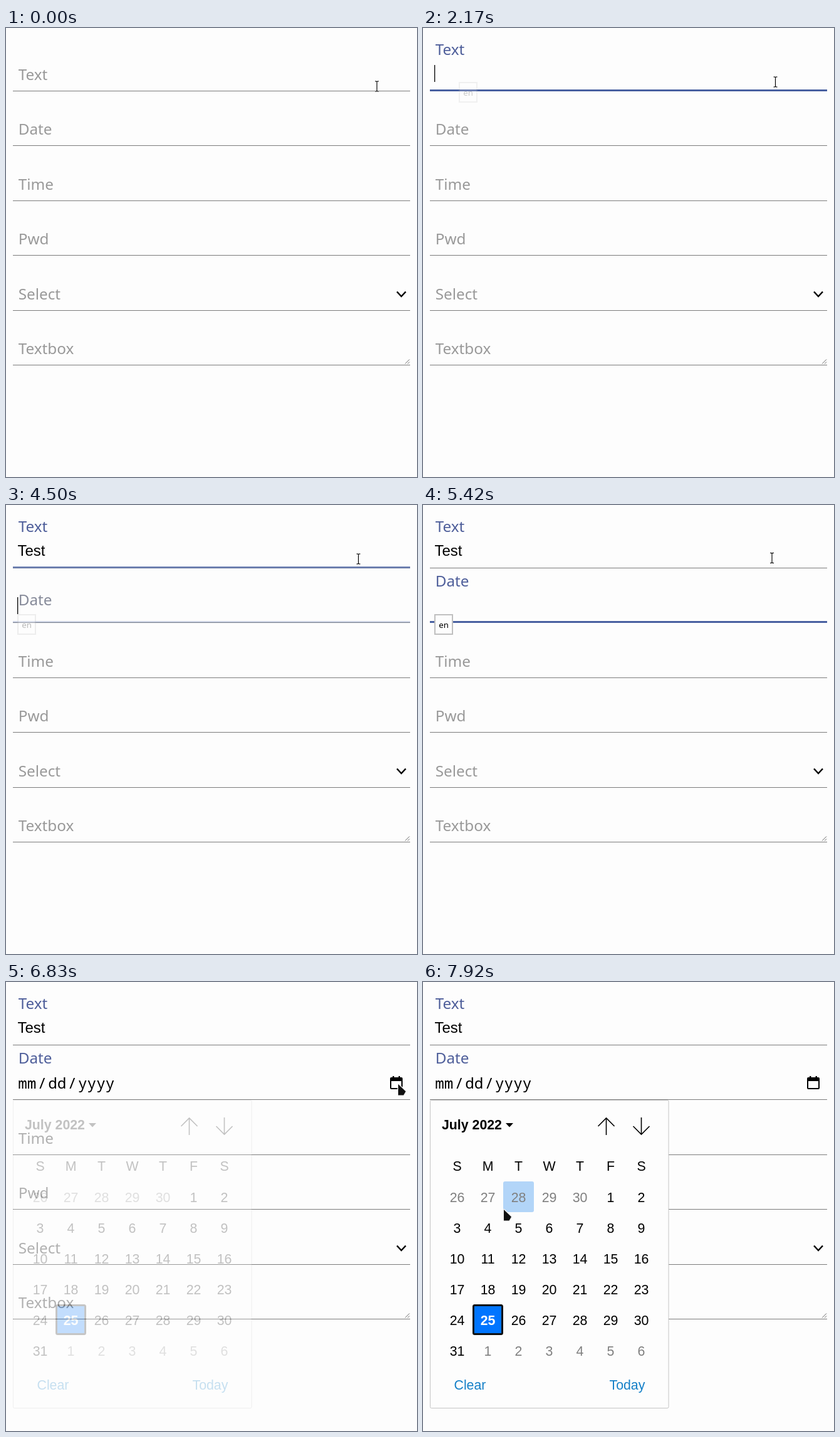
Recreate the animation shown at these times as an HTML page. Size 656 by 716 pixels, loop 8000 ms.

```html
<!DOCTYPE html>
<html lang="en">
<head>
<meta charset="utf-8">
<title>Form fields</title>
<style>
  html, body { margin: 0; width: 100%; height: 100%; overflow: hidden; background: #fdfdfd; }
  svg { display: block; width: 656px; height: 716px; }
  .label { font: 24.3px "Noto Sans", sans-serif; }
  .input { font: 24px "Liberation Sans", Arial, sans-serif; }
  .mono { font: 24.3px "Noto Sans Mono", monospace; }
  .tip { font: 13.3px "Noto Sans", sans-serif; text-anchor: middle; }
  .cal { font: 21.3px "Liberation Sans", Arial, sans-serif; }
  .mid { text-anchor: middle; }
  .bold { font-weight: bold; }
  .dim { fill: #808080; }
  .today { font-weight: bold; fill: #fff; }
  .link { fill: #1580c8; }
  .stroke { fill: none; stroke: #000; }
</style>
</head>
<body>
<svg viewBox="0 0 656 716">
  <g id="fields"></g>
  <path class="stroke" stroke-width="2.5" d="M624 420.5l7 7.5 7-7.5"/>
  <path fill="none" stroke="#666" d="M637 535.5l7-7M641 535.5l3-3"/>
  <text id="typed" class="input" x="18.4" y="81"></text>
  <g id="date">
    <text class="mono" y="170"><tspan x="19.2">mm</tspan><tspan x="50.6">/</tspan><tspan x="67.2">dd</tspan><tspan x="98.6">/</tspan><tspan x="115">yyyy</tspan></text>
    <path fill-rule="evenodd" d="M615 152h2v-2h2.500v2h7v-2h2.500v2h2q2 0 2 2v15q0 2-2 2h-16q-2 0-2-2v-15q0-2 2-2zM615 158v11h16v-11z"/>
  </g>
  <rect id="caret" width="1.3" height="27"/>
  <g id="tip">
    <rect x="1" y="1" width="28" height="31" fill="#fdfdfd" stroke="#c0c0c0" stroke-width="2"/>
    <text class="tip" x="15" y="22">en</text>
  </g>
  <g id="popup">
    <rect x="11.500" y="188.500" width="380.500" height="491" rx="2" fill="#fdfdfd" stroke="#c4c4c4"/>
    <text class="cal bold" x="30" y="235">July 2022</text>
    <path d="M132 225h12l-6 6.500z"/>
    <path class="stroke" stroke-width="1.6" d="M292.500 244v-27M279.500 230l13-13 13 13M348.500 216v27M335.500 230l13 13 13-13"/>
    <rect id="hover" width="49" height="49" rx="3" fill="#b2d5f8"/>
    <rect x="80.500" y="515.500" width="46" height="46" rx="2" fill="#0075ff" stroke="#101010" stroke-width="3"/>
    <g id="days"></g>
    <text class="cal link" x="49.500" y="650">Clear</text>
    <text class="cal link" x="297.500" y="650">Today</text>
  </g>
  <g id="beam">
    <path fill="none" stroke="#f4f4f4" stroke-width="3" d="M-3-8h6M-3 8h6M0-8v16"/>
    <path class="stroke" stroke-width="1.1" d="M-3-8h2l1 1 1-1h2M-3 8h2l1-1 1 1h2M0-7v14"/>
  </g>
  <path id="arrow" fill="#101010" stroke="#f4f4f4" stroke-width="2.500" paint-order="stroke" stroke-linejoin="round" d="M0 0v17.500h8.500l3.500-6z"/>
</svg>
<script>
const LOOP = 8000, FPS = 12, BLINK = 583, CELL = 49;
const TYPE_AT = 3580, KEY_GAP = 165;
const FOCUS_TEXT = 750, FOCUS_DATE = 4500, SHOW_DATE = 6400, BLUR = 6580;

const $ = id => document.getElementById(id);
function add(parent, tag, attrs, text = '') {
  const el = document.createElementNS('http://www.w3.org/2000/svg', tag);
  for (const k in attrs) el.setAttribute(k, attrs[k]);
  el.textContent = text;
  return parent.appendChild(el);
}
const move = (el, x, y) => el.setAttribute('transform', `translate(${x} ${y})`);
const show = (el, amount) => el.setAttribute('opacity', Number(amount));

const clamp = (v, lo, hi) => Math.min(hi, Math.max(lo, v));
const ramp = (t, from, to) => clamp((t - from) / (to - from), 0, 1);
const ease = k => k * k * (3 - 2 * k);
const enter = (t, at) => ease(ramp(t, at - 80, at + 160));
const mix = (a, b, k) => `rgb(${a.map((v, i) => Math.round(v + (b[i] - v) * k))})`;

const fields = ['Text', 'Date', 'Time', 'Pwd', 'Select', 'Textbox'].map((name, i) => {
  const dy = Math.round(87.4 * i), g = $('fields');
  add(g, 'rect', { x: 11, y: 100 + dy, width: 634, height: 1, fill: '#7c7c7c' });
  const line = add(g, 'rect', { x: 11, y: 98 + dy, width: 634, height: 3, fill: '#4860a0' });
  const label = add(g, 'text', { class: 'label', x: 19.7 }, name);
  return (focus, raise) => {
    show(line, focus);
    label.setAttribute('y', 83 + dy - 40 * raise);
    label.setAttribute('fill', mix([153, 153, 153], [78, 94, 154], raise));
  };
});

function addDay(col, y, text, style = '') {
  add($('days'), 'text', { class: 'cal mid ' + style, x: 54.5 + CELL * col, y }, text);
}
[...'SMTWTFS'].forEach((d, col) => addDay(col, 301, d));
for (let i = 0; i < 42; i++) {
  const d = new Date(2022, 5, 26 + i), n = d.getDate();
  const style = d.getMonth() !== 6 ? 'dim' : n === 25 ? 'today' : '';
  addDay(i % 7, 351 + CELL * Math.floor(i / 7), n, style);
}

// Each glide: start, end, x, y
const GLIDES = [
  [0, 420, 562.5, 86], [5330, 5420, 557, 84.5], [5420, 6170, 630, 91],
  [6250, 6700, 626, 163], [7000, 7580, 289, 352], [7580, 7920, 129, 363]
];
function pointerAt(t) {
  let x = 592, y = 93;
  for (const [from, to, toX, toY] of GLIDES) {
    const k = ease(ramp(t, from, to));
    x += (toX - x) * k;
    y += (toY - y) * k;
  }
  return [x, y];
}

function drawFields(t) {
  const text = enter(t, FOCUS_TEXT), date = enter(t, FOCUS_DATE);
  fields.forEach((set, i) => {
    if (i === 0) set(text - date, text);
    else if (i === 1) set(date - enter(t, BLUR), date);
    else set(0, 0);
  });
}

function drawTyping(t) {
  const typed = $('typed'), caret = $('caret'), tip = $('tip');
  const count = clamp(Math.floor((t - TYPE_AT) / KEY_GAP) + 1, 0, 4);
  typed.textContent = 'Test'.slice(0, count);

  const onDate = t >= FOCUS_DATE;
  const focused = onDate ? FOCUS_DATE : FOCUS_TEXT;
  const lastKey = count && !onDate ? TYPE_AT + KEY_GAP * (count - 1) : focused;
  const lit = Math.floor((t - lastKey + 6) / BLINK) % 2 === 0;
  show(caret, lit && t >= FOCUS_TEXT && t < SHOW_DATE);
  move(caret, count && !onDate ? 18 + typed.getComputedTextLength() : 18, onDate ? 147 : 59);

  move(tip, onDate ? 18 : 57, onDate ? 174 : 86);
  show(tip, enter(t, focused) * (1 - ramp(t, focused + 1090, focused + 1500)));
}

function drawPicker(t) {
  const [x, y] = pointerAt(t);
  const open = ramp(t, 6670, 7000) ** 2;
  const hasDate = t >= SHOW_DATE;
  show($('date'), hasDate);
  show($('popup'), open);

  const inPopup = open > 0 && x < 392 && y > 188;
  const onIcon = hasDate && x > 611 && y > 148 && y < 174;
  const isArrow = inPopup || onIcon;
  show($('arrow'), isArrow);
  show($('beam'), !isArrow);
  move($('arrow'), x, y);
  move($('beam'), x, y);

  const col = Math.floor((x - 30) / CELL), row = Math.floor((y - 318) / CELL);
  show($('hover'), inPopup && col >= 0 && col < 7 && row >= 0 && row < 6);
  move($('hover'), 30 + CELL * col, 318 + CELL * row);
}

// Time advances in twelve steps a second, rounded to 10 ms
function tick() {
  const step = Math.floor((performance.now() % LOOP + 5) * FPS / 1000) % (LOOP * FPS / 1000);
  const t = Math.round(step * 100 / FPS) * 10;
  drawFields(t);
  drawTyping(t);
  drawPicker(t);
  requestAnimationFrame(tick);
}
tick();
</script>
</body>
</html>
```
